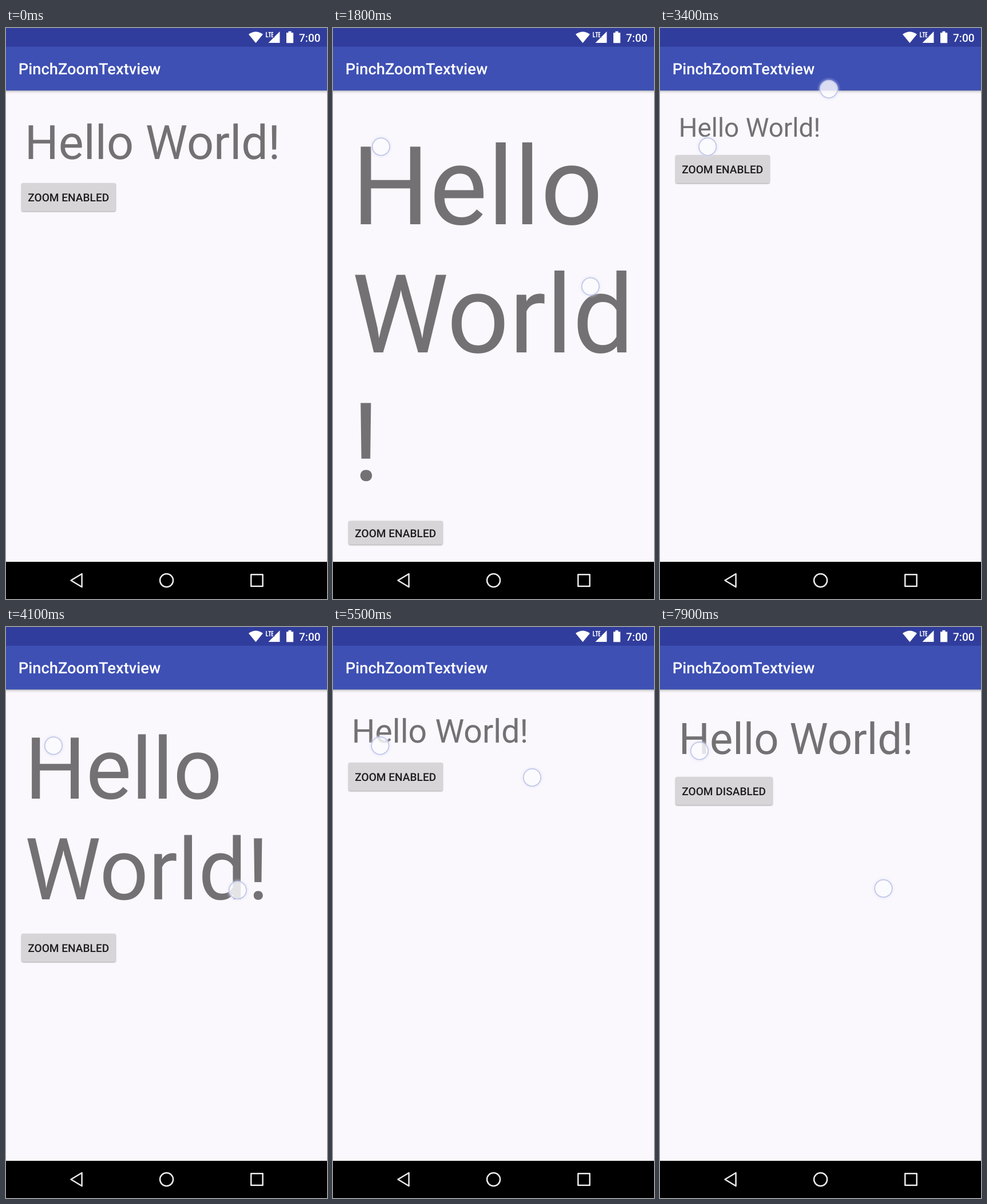
An HTML page that plays this animation: 561x998 px, repeating every 8000 ms.

```html
<!DOCTYPE html>
<html lang="en">
<head>
<meta charset="utf-8">
<title>PinchZoomTextview</title>
<style>
  html, body { margin: 0; width: 100%; height: 100%; overflow: hidden; background: #faf8fc; }
  svg { display: block; width: 561px; height: 998px; }
  text { font-family: Roboto, Arial, sans-serif; text-rendering: geometricPrecision; }
  .medium { font-weight: 500; }
  #hello { fill: #737174; }
  #plate { fill: #d7d5d8; filter: drop-shadow(0 1.5px 1.3px rgba(0, 0, 0, .36)); }
</style>
</head>
<body>
<svg viewBox="0 0 561 998">
  <defs>
    <linearGradient id="shade" x2="0" y2="1">
      <stop offset="0" stop-color="#000" stop-opacity=".3"/>
      <stop offset=".4" stop-color="#000" stop-opacity=".1"/>
      <stop offset="1" stop-color="#000" stop-opacity="0"/>
    </linearGradient>
    <radialGradient id="glow">
      <stop offset=".72" stop-color="#dfe1fa" stop-opacity=".4"/>
      <stop offset="1" stop-color="#dfe1fa" stop-opacity="0"/>
    </radialGradient>
    <clipPath id="textClip"><rect y="109" width="561" height="791"/></clipPath>
    <clipPath id="plateClip"><rect id="plateBox" x="27.3" rx="2.7"/></clipPath>
    <clipPath id="labelClip"><rect id="labelBox" x="27" width="180"/></clipPath>
    <g id="spot">
      <circle r="21" fill="url(#glow)"/>
      <circle r="15.2" fill="#fff" fill-opacity=".72" stroke="#c6cbea" stroke-width="2"/>
    </g>
  </defs>

  <rect width="561" height="998" fill="#faf8fc"/>
  <rect y="109" width="561" height="6" fill="url(#shade)"/>
  <rect y="32" width="561" height="77.2" fill="#3e50b4"/>
  <rect width="561" height="32.7" fill="#303d9d"/>
  <text class="medium" x="21.8" y="81" font-size="27.3" fill="#fff">PinchZoomTextview</text>

  <g fill="#fff">
    <path d="M424 11Q436.5 2 449 11L436.5 26.2z"/>
    <path d="M478.5 6V26H458.5L467.5 17H469V15.5z"/>
    <path d="M455 7v8.5h3.4M458.6 7.7h4.6M460.9 7.7v8.5M467.2 7.7h-2.6v7.8h2.6M464.6 11.5h2.3"
          fill="none" stroke="#fff" stroke-width="1.5"/>
    <path d="M490 8.2h3.5V5.8h5v2.4h3.7V26.3H490z"/>
    <text class="medium" x="512" y="24" font-size="19.1">7:00</text>
  </g>

  <g id="hello" clip-path="url(#textClip)"></g>

  <g id="button">
    <rect id="plate" x="27.3" rx="2.7"/>
    <g clip-path="url(#plateClip)"><circle id="ripple" cx="133" fill="#000"/></g>
    <g clip-path="url(#labelClip)">
      <text id="label" class="medium" x="38.2" font-size="19.1" fill="#1c1b1d"></text>
    </g>
  </g>

  <rect y="933" width="561" height="65" fill="#000"/>
  <g fill="none" stroke="#ebebeb" stroke-width="2.5" stroke-linejoin="round">
    <path d="M113.5 965.5L132.6 954V977z"/>
    <circle cx="280.6" cy="965.5" r="11.5"/>
    <rect x="428.3" y="955.3" width="20.4" height="20.4"/>
  </g>

  <use id="anchor" href="#spot"/>
  <use id="finger" href="#spot"/>
</svg>

<script>
const LOOP = 8000, STEP = 100;
const PHRASE = 'Hello World!';
const LEFT = 32.7, TOP = 142, LINE_WIDTH = 495.6;
// Font metrics in em
const ASCENT = 1.0562, LEADING = 1.1719, DESCENT = 0.271;

// Pinch: time, finger x, finger y, text size
const PINCH = [
  [800, 402, 272, 82.8], [1100, 414, 290, 89], [1400, 438, 328, 109.2],
  [1700, 450, 420, 165], [2000, 450, 515, 255], [2100, 448, 508, 256],
  [2300, 436.5, 432.5, 193.7], [2500, 420, 332, 109], [2800, 385, 235, 70],
  [3100, 335, 155, 53], [3400, 295, 107, 45.9], [3500, 297, 112, 46],
  [3700, 330, 190, 50], [3900, 370, 310, 71], [4100, 405, 460, 150],
  [4300, 424, 580, 310], [4500, 411.5, 648.5, 433], [4700, 406, 662, 480],
  [4900, 395, 560, 260], [5100, 370, 385, 95], [5200, 360, 315, 72],
  [5350, 348, 262, 57], [5500, 348, 263, 57.2], [5800, 365, 352, 76]
];
const SECOND = [[7300, 345, 290, 76], [7600, 374, 385, 76], [7900, 390.5, 457, 76]];

const $ = id => document.getElementById(id);
const set = (el, attrs) => { for (const k in attrs) el.setAttribute(k, attrs[k]); };
const mix = (a, b, p) => a + (b - a) * p;
const clamp = v => Math.max(0, Math.min(1, v));

const lines = [...PHRASE].map(() =>
  $('hello').appendChild(document.createElementNS('http://www.w3.org/2000/svg', 'text')));

const pen = document.createElement('canvas').getContext('2d');
pen.font = '100px Roboto, Arial, sans-serif';
const ems = s => pen.measureText(s).width / 100;

function sample(keys, t) {
  const next = keys.findIndex(k => k[0] > t);
  if (next === 0) return keys[0].slice(1);
  if (next < 0) return keys[keys.length - 1].slice(1);
  const a = keys[next - 1], b = keys[next];
  const p = (t - a[0]) / (b[0] - a[0]);
  return [mix(a[1], b[1], p), mix(a[2], b[2], p), a[3] * (b[3] / a[3]) ** p];
}

// Fewest breaks inside words, then the most even lines
function wrap(size) {
  const n = PHRASE.length, best = [{ cost: 0, rows: [] }];
  for (let j = 1; j <= n; j++) {
    best[j] = { cost: Infinity, rows: [] };
    if (PHRASE[j] === ' ') continue;
    for (let i = 0; i < j; i++) {
      const row = PHRASE.slice(i, j).trimEnd();
      const slack = LINE_WIDTH - ems(row) * size;
      if (slack < 0 && j > i + 1) continue;
      const split = j < n && PHRASE[j - 1] !== ' ' ? 1e7 : 0;
      const cost = best[i].cost + split + (j < n ? slack * slack : 0);
      if (cost < best[j].cost) best[j] = { cost, rows: [...best[i].rows, row] };
    }
  }
  return best[n].rows;
}

function drawText(size) {
  const rows = wrap(size);
  lines.forEach((el, i) => {
    el.textContent = rows[i] || '';
    set(el, { x: LEFT, y: TOP + (ASCENT + i * LEADING) * size, 'font-size': size });
  });
  return TOP + (ASCENT + DESCENT + (rows.length - 1) * LEADING) * size;
}

function drawButton(y, t) {
  const off = t >= 6800;
  const height = Math.min(49.1, 902.8 - y);
  $('button').style.display = height > 1 ? '' : 'none';
  if (height <= 1) return;
  const box = { y, height, width: off ? 169.3 : 164.3 };
  set($('plate'), box);
  set($('plateBox'), box);
  set($('labelBox'), { y, height: Math.max(0, height - 5.2) });
  $('label').textContent = off ? 'ZOOM DISABLED' : 'ZOOM ENABLED';
  // A squeezed label sticks to the top of its box
  set($('label'), { y: y + 25.7 + Math.max(0, (height - 36.3) / 2) });
  const p = (t - 6600) / 400;
  set($('ripple'), {
    cy: y + 24.5, r: 10 + 48 * clamp(p),
    opacity: p > 0 && p < 1 ? 0.12 * (1 - p) : 0
  });
}

function drawSpot(el, x, y, opacity) {
  set(el, { x, y, opacity });
}

function draw(t) {
  const again = t >= SECOND[0][0];
  const [x, y, size] = sample(again ? SECOND : PINCH, t);
  drawButton(drawText(size) + 19.1, t);
  const shown = again ? 1 : t < 800 ? 0 : clamp((6200 - t) / 300);
  drawSpot($('finger'), x, y, shown);
  if (again) drawSpot($('anchor'), 69, 216.5, shown);
  else drawSpot($('anchor'), mix(84, 82.4, clamp((t - 1400) / 4100)), 207.5, shown);
}

const start = performance.now();
let last = -1;
function tick() {
  const t = Math.floor(((performance.now() - start) % LOOP) / STEP) * STEP;
  if (t !== last) draw(last = t);
  requestAnimationFrame(tick);
}
tick();
</script>
</body>
</html>
```
